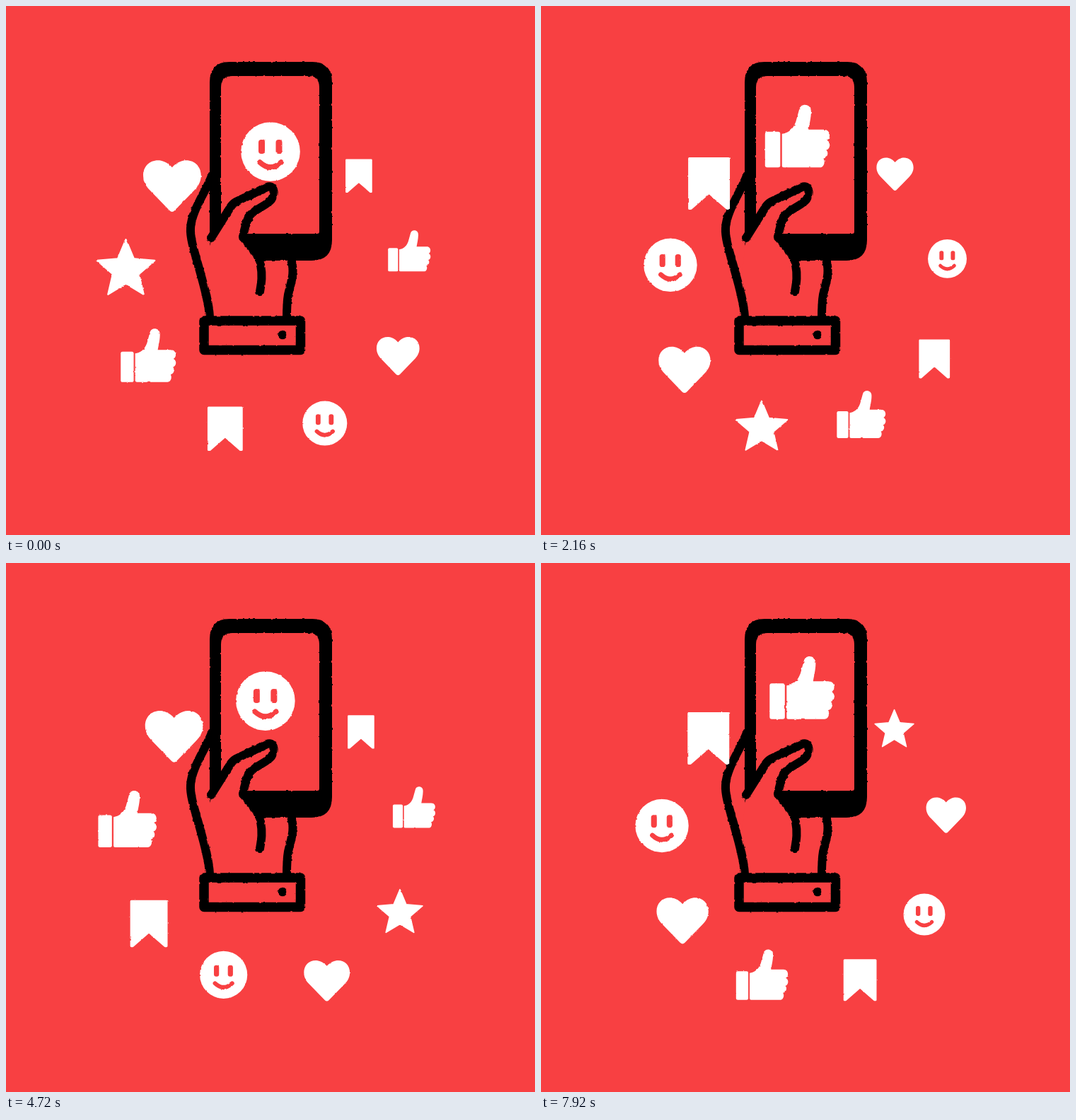
These frames come from a looping animation (748 by 748 pixels, 8000 ms). An HTML page:

```html
<!DOCTYPE html>
<html lang="en">
<head>
<meta charset="utf-8">
<title>Reactions</title>
<style>
  html, body { margin: 0; width: 100%; height: 100%; overflow: hidden; background: #f84042; }
  svg { position: absolute; inset: 0; width: 100%; height: 100%; }
  .scene { will-change: transform; }
  .line { fill: none; stroke: #000; stroke-width: 12; stroke-linecap: round; stroke-linejoin: round; }
  .skin, .cut { fill: #f84042; }
  .smile { fill: none; stroke: #f84042; stroke-width: 7.5; stroke-linecap: round; }
  .soft { stroke: #fff; stroke-width: 4; stroke-linejoin: round; }
  .rough { filter: url(#rough); }
</style>
</head>
<body>
<svg class="scene" viewBox="0 0 748 748">
  <defs>
    <filter id="rough" x="-10%" y="-10%" width="120%" height="120%" color-interpolation-filters="sRGB">
      <feTurbulence type="fractalNoise" baseFrequency=".16" numOctaves="2" seed="4"/>
      <feDisplacementMap in="SourceGraphic" scale="2.6" xChannelSelector="R" yChannelSelector="G"/>
    </filter>
  </defs>
  <g class="rough">
    <path fill-rule="evenodd" d="M316 79H433Q461 79 461 108V331Q461 360 432 360H316Q288 360 288 331V108Q288 79 316 79Z
      M320 99Q304 99 304 115V322H440Q443 322 443 319V115Q443 99 427 99Z"/>
    <path id="thumbFill" class="skin"/>
    <path class="skin" d="M290 328L320 290L340 306L335 327C345 338 357 350 360 366V400H282Z"/>
    <path class="line" d="M291 240C283 262 262 290 261 314C260 330 268 352 275 378C281 400 287 420 288 440"/>
    <path class="line" d="M403 358C409 378 403 390 399 408Q397 420 397 440"/>
    <path class="line" d="M335 327C345 338 357 350 360 366C363 382 361 392 359 404"/>
    <path id="thumbLine" class="line"/>
    <rect class="line" x="280" y="445" width="136.500" height="41.500" style="stroke-width:13.500"/>
    <circle cx="391" cy="465" r="6.300"/>
  </g>
</svg>
<svg viewBox="0 0 748 748">
  <defs>
    <g id="face">
      <circle r="41.800"/>
      <rect class="cut" x="-17" y="-17" width="9" height="20" rx="4"/>
      <rect class="cut" x="7.500" y="-17" width="9" height="20" rx="4"/>
      <path class="smile" d="M-15 15Q0 29 15 15"/>
    </g>
    <path id="heart" d="M0 -28C7 -36 15 -38.500 21 -38.500C34 -38.500 43 -29 43 -16C43 -6 38 1 33 6L4 36Q0 40 -4 36
      L-33 6C-38 1 -43 -6 -43 -16C-43 -29 -34 -38.500 -21 -38.500C-15 -38.500 -7 -36 0 -28Z"/>
    <path id="star" class="soft" style="stroke-width:2.500"/>
    <path id="mark" class="soft" d="M-29 -37H29V37H27L0 13.500L-27 37H-29Z"/>
    <g id="like">
      <rect x="-45.500" y="-6" width="21.500" height="50.500" rx="3"/>
      <path d="M-21.500 -3C-13 -4 -6 -9 -2 -20L3 -38C5 -47 19 -46 19.500 -36C20 -27 17 -16 16 -9H38C47 -9 48 3 42 6
        C48 9 47 18 41 20C45 23 43 31 37 32C40 36 38 44.500 32 44.500H-19Q-21.500 44.500 -21.500 42Z"/>
    </g>
  </defs>
  <g id="ring" fill="#fff"></g>
</svg>
<script>
const LOOP = 8000, TICK = 40, SLOTS = 9, SLOT_ANGLE = 360 / SLOTS;
const CENTER = { x: 374, y: 400 };

// shape, orbit radius, angle offset in degrees, shape offset x and y
const ICONS = [
  ['face', 194, 0, 0, 0],
  ['heart', 204, 3, 0, 4.2],
  ['star', 206.3, 2.5, 0, 0],
  ['like', 206, 2, 2, -18],
  ['mark', 206.5, 1.8, 0.4, 2],
  ['face', 205, 2, 0, 0],
  ['heart', 204.6, 1.8, 0, -2],
  ['like', 202.4, 2.75, -2, -14],
  ['mark', 203.5, 2.2, 0.3, 1.8]
];
// start and end of each turn of the ring
const TURNS = [[40, 860], [1360, 2160], [2720, 3422], [4000, 4720], [5320, 6115], [6640, 7400]];
// times during which the thumb reaches out
const REACHES = [[1120, 1320], [2520, 2680], [3760, 3960], [5080, 5280], [6440, 6600], [7720, 7920]];
const THUMB = {
  rest: 'M290 328L317 285Q320 280 325 277L369 256C378 252 382 264 375 274C369 282 350 288 344 297C340 304 337 316 335 327',
  reach: 'M290 328L319 290Q322 285 327 282L386 259C396 255 401 267 394 275C386 284 360 290 351 299C344 306 339 318 335 327'
};

const $ = id => document.getElementById(id);
const clamp = v => Math.min(1, Math.max(0, v));
const ease = v => v * v * (3 - 2 * v);

$('star').setAttribute('d', 'M' + Array.from({ length: 10 }, (_, i) => {
  const r = i % 2 ? 21.5 : 47.5, a = i * Math.PI / 5;
  return `${(r * Math.sin(a)).toFixed(2)} ${(-r * Math.cos(a)).toFixed(2)}`;
}).join('L') + 'Z');

$('ring').innerHTML = ICONS.map(([shape, , , x, y]) =>
  `<g><g class="rough"><use href="#${shape}" x="${x}" y="${y}"/></g></g>`).join('');
const nodes = [...$('ring').children];

const slotScale = slot => 1 - 0.0491 * slot;

function placeIcons(t) {
  const turn = Math.max(0, TURNS.findLastIndex(([start]) => t >= start));
  const [start, end] = TURNS[turn];
  const u = clamp((t - start) / (end - start));
  const moved = ease(u), grown = ease(clamp(u / 0.75));
  ICONS.forEach(([, radius, offset], i) => {
    const slot = (i + turn) % SLOTS;
    const a = ((slot + moved) * SLOT_ANGLE + offset) * Math.PI / 180;
    const x = CENTER.x - radius * Math.sin(a), y = CENTER.y - radius * Math.cos(a);
    const last = slot === SLOTS - 1;
    const scale = last ? slotScale(slot) + (1 - slotScale(slot)) * grown : slotScale(slot + moved);
    nodes[i].setAttribute('transform', `translate(${x.toFixed(2)} ${y.toFixed(2)}) scale(${scale.toFixed(4)})`);
  });
}

let pose = '';
function setThumb(t) {
  const next = REACHES.some(([from, to]) => t >= from && t < to) ? 'reach' : 'rest';
  if (next === pose) return;
  pose = next;
  $('thumbLine').setAttribute('d', THUMB[pose]);
  $('thumbFill').setAttribute('d', THUMB[pose] + 'Z');
}

let lastTick = -1;
function frame() {
  const t = Math.floor((performance.now() % LOOP) / TICK) * TICK;
  if (t !== lastTick) {
    lastTick = t;
    placeIcons(t);
    setThumb(t);
  }
  requestAnimationFrame(frame);
}
frame();
</script>
</body>
</html>
```
